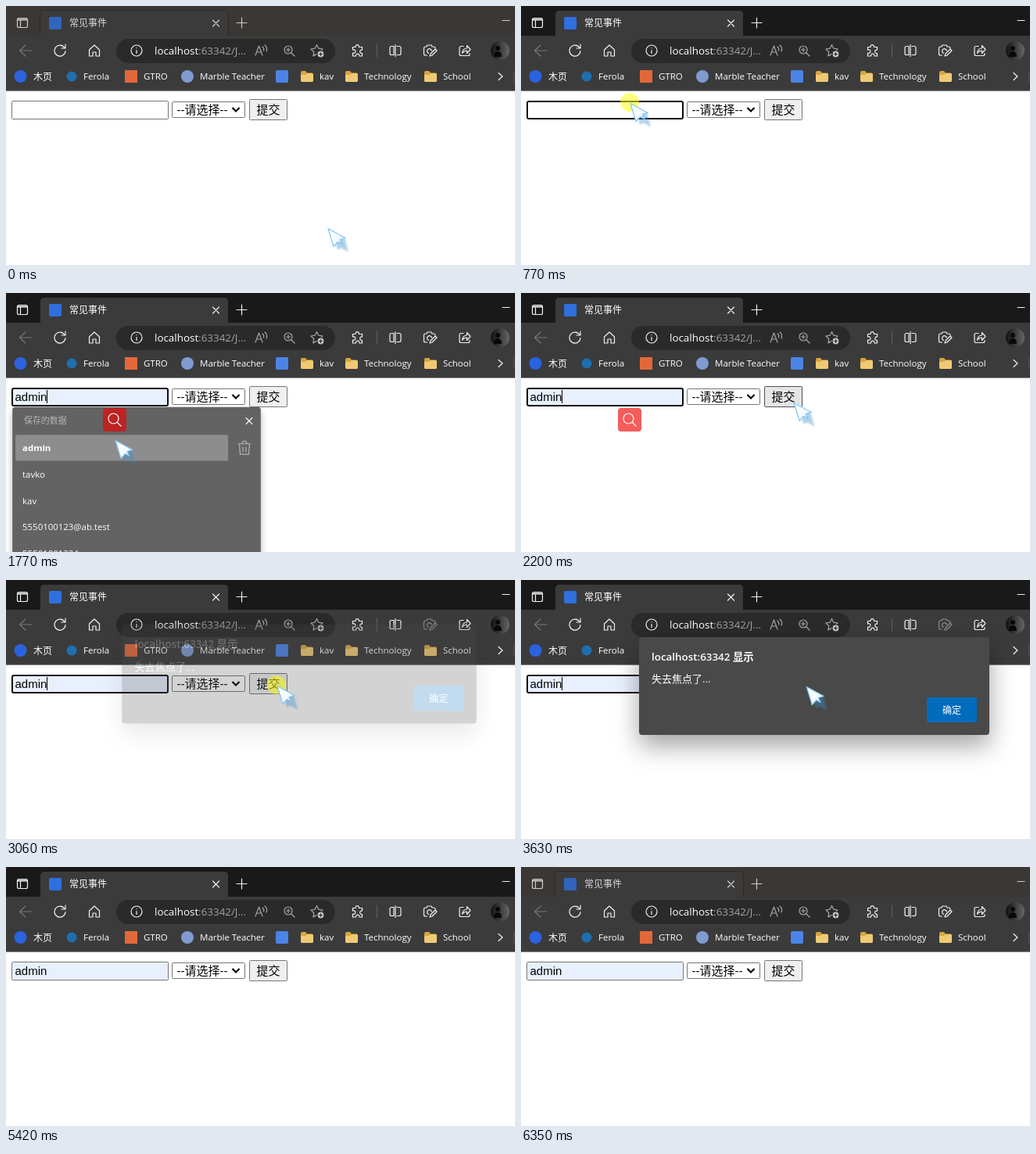
Write an HTML page that moves like this. It is 651x331 px and loops after 6410 ms.

```html
<!DOCTYPE html>
<html lang="zh">
<head>
<meta charset="utf-8">
<style>
html, body { margin: 0; width: 100%; height: 100%; overflow: hidden; background: #fff; }
svg { display: block; width: 651px; height: 331px; }
text { font: 500 11.5px "Open Sans", "Noto Sans CJK SC", "Noto Sans CJK", sans-serif; fill: #fff; white-space: pre; }
.cjk { font-size: 12px; }
.url { font-size: 13.4px; font-weight: 400; }
.form { font: 15px "Liberation Sans", "Noto Sans CJK SC", "Noto Sans CJK", sans-serif; fill: #000; }
.line { fill: none; stroke: #f0f0f0; stroke-width: 1.2; stroke-linecap: round; stroke-linejoin: round; }
.dim { stroke: #a6a6a6; }
</style>
</head>
<body>
<svg viewBox="0 0 651 331">
  <defs>
    <filter id="shade" x="-20%" y="-40%" width="140%" height="200%">
      <feDropShadow dx="0" dy="14" stdDeviation="16" flood-color="#000" flood-opacity=".36"/>
    </filter>
    <filter id="soft" x="-10%" y="-10%" width="120%" height="120%">
      <feDropShadow dx="0" dy="5" stdDeviation="5" flood-color="#000" flood-opacity=".35"/>
    </filter>
    <filter id="blur"><feGaussianBlur stdDeviation="1.3"/></filter>
    <linearGradient id="photo" x2="1"><stop stop-color="#111"/><stop offset="1" stop-color="#666"/></linearGradient>
    <linearGradient id="ice" x2="1" y2="1"><stop stop-color="#fff"/><stop offset=".6" stop-color="#f2faff"/><stop offset="1" stop-color="#a5d8f8"/></linearGradient>
    <g id="folder">
      <path d="M0 2q0-2 2-2h4l2 2.500h6q2 0 2 2v7.500q0 2-2 2H2q-2 0-2-2z" fill="#d9a53f"/>
      <path d="M0 5h6l2-2h6q2 0 2 2v7q0 2-2 2H2q-2 0-2-2z" fill="#efca75"/>
    </g>
  </defs>

  <!-- Title bar -->
  <rect id="titlebar" width="651" height="39"/>
  <path id="tabEdge" d="M43.500 38V11q0-5.500 5-5.500h231q5 0 5 5.500v27" fill="none" stroke="#2c2928"/>
  <path d="M44 38V11q0-5 5-5h230q5 0 5 5v27z" fill="#3b3b3b"/>
  <g id="titleItems">
    <g class="line">
      <rect x="14.500" y="15.500" width="13" height="12" rx="2"/>
      <path stroke-width="2" d="M15 17.500h12"/>
      <path d="M18.500 18.500v9M264.500 18l8 8M272.500 18l-8 8M295 21.500h13M301.500 15v13M635 18.500h9"/>
    </g>
    <rect x="55" y="14" width="16" height="16" rx="2" fill="#2f6fde"/>
    <text class="cjk" x="81" y="26">常见事件</text>
  </g>

  <!-- Toolbar -->
  <rect y="38" width="651" height="71" fill="#3b3b3b"/>
  <rect x="141" y="42" width="280" height="31" rx="15.500" fill="#2a2a2a"/>
  <g class="line">
    <path stroke="#777" d="M33 57H18m7-7l-7.500 7 7.500 7"/>
    <path d="M75 53.500a7 7 0 1 0 1 4M76 49v5h-5"/>
    <path d="M106.500 56l6.500-6 6.500 6v8h-4.500v-5h-4v5h-4.500z"/>
    <circle cx="167" cy="57" r="7"/><path d="M167 56.500v4M167 53.500v.2"/>
    <path class="dim" d="M319 63l4.500-12 4.500 12m-7.500-4h6M328 52q2.500 2 1.500 5M331 50q4 3 2 8"/>
    <g class="dim"><circle cx="361" cy="56" r="5"/><path d="M365 60l4 4M358.500 56h5M361 53.500v5"/></g>
    <path class="dim" d="M397.500 49.500l2.300 4.700 5.200.8-3.800 3.700.9 5.200-4.600-2.500-4.600 2.500.9-5.200-3.800-3.700 5.200-.8z"/>
    <circle cx="402.500" cy="61.500" r="4.500" fill="#c8c8c8" stroke="#2a2a2a"/><path stroke="#2a2a2a" d="M400.500 61.500h4M402.500 59.500v4"/>
    <path d="M443.500 52.500h3.500a2.300 2.300 0 1 1 4.500 0h4v3.500a2.300 2.300 0 1 0 0 4.500v3.500h-3.500a2.300 2.300 0 1 0-4.500 0h-4v-4a2.300 2.300 0 1 0 0-4z"/>
    <path stroke="#5c5c5c" d="M474.500 49v16"/>
    <path d="M496 51.500h-3q-2 0-2 2v7q0 2 2 2h3zM500 51.500h3q2 0 2 2v7q0 2-2 2h-3M498 49.500v15"/>
    <g id="camera"><path d="M549 54q0-2-2-2h-2l-1-2h-5l-1 2h-1.500q-2 0-2 2v7q0 2 2 2h2"/><path d="M544.500 57a3 3 0 1 0-4 3.500M542 64l1-3 6-6 2 2-6 6z"/></g>
    <path d="M585 51.500h-3q-2 0-2 2v8q0 2 2 2h9q2 0 2-2v-1M583.500 60q1-6 6-6v-3.500l4.500 5-4.500 5v-3.500q-3.500 0-6 3z"/>
    <path d="M630 85.500l5 4.500-5 4.500"/><path stroke="#555" d="M649.500 83v14"/>
  </g>
  <circle cx="632" cy="57" r="12" fill="url(#photo)"/>
  <path d="M624 65q0-7 5-7 5 0 5 7zM626 54a3 3 0 1 1 6 0a3 3 0 1 1-6 0" fill="#080808"/>
  <text class="url" x="190" y="62">localhost<tspan fill="#a3a3a3">:63342/J...</tspan></text>

  <!-- Bookmarks -->
  <circle cx="18.500" cy="90" r="8" fill="#2b62df"/>
  <circle cx="84" cy="90" r="6.500" fill="#1d6fb0"/>
  <rect x="152" y="82" width="16" height="16" fill="#e2683a"/>
  <circle cx="232" cy="90" r="8" fill="#7f9bd0"/>
  <rect x="345" y="82" width="16" height="16" rx="2" fill="#4b83e6"/>
  <use href="#folder" x="377" y="83"/><use href="#folder" x="434" y="83"/><use href="#folder" x="535" y="83"/>
  <text class="cjk" x="35" y="94.500">木页</text>
  <text x="99" y="94">Ferola</text>
  <text x="176" y="94">GTRO</text>
  <text x="248" y="94">Marble Teacher</text>
  <text x="401" y="94">kav</text>
  <text x="458" y="94">Technology</text>
  <text x="559" y="94">School</text>

  <!-- Page -->
  <rect y="108" width="651" height="1" fill="#8c8c8c"/>
  <rect y="109" width="651" height="222" fill="#fff"/>
  <rect id="field"/>
  <text id="value" class="form" x="11.500" y="138">admin</text>
  <path id="caret" d="M52.500 124v17" stroke="#000"/>
  <rect x="212.500" y="122.500" width="93" height="20" rx="1" fill="#fff" stroke="#767676"/>
  <text class="form" x="218.500" y="138">--请选择--</text>
  <path d="M289.500 130l4.500 4.500 4.500-4.500" fill="none" stroke="#000" stroke-width="2.200"/>
  <rect id="submit" x="311.500" y="119.500" width="48" height="26" rx="1"/>
  <text class="form" x="320.500" y="138">提交</text>

  <!-- Saved entries -->
  <g id="popup">
    <rect x="7" y="145" width="320" height="211" rx="4" fill="#4a4a4a" filter="url(#soft)"/>
    <text x="22" y="167" style="font-size:11px;fill:#a9a9a9">保存的数据</text>
    <path class="line" d="M308 159l8 8M316 159l-8 8"/>
    <g id="rowHover">
      <rect x="11" y="181" width="274" height="33.500" rx="2" fill="#7a7a7a"/>
      <path class="line dim" d="M298 192.500h16M303 192q0-3 3-3t3 3M299.500 193l1 13h11l1-13M304 196.500v6M308 196.500v6"/>
    </g>
    <text id="firstRow" x="20" y="202">admin</text>
    <text x="20" y="236">tavko</text>
    <text x="20" y="270">kav</text>
    <text x="20" y="304">5550100123@ab.test</text>
    <text x="20" y="338">55501001234</text>
  </g>
  <g id="finder">
    <rect x="124" y="147" width="30" height="30" rx="4" fill="#f00000" opacity=".64"/>
    <g class="line" style="stroke:#fff"><circle cx="137.500" cy="160.500" r="6.500"/><path d="M142.500 165.500l4.500 4.500"/></g>
  </g>

  <!-- Alert -->
  <g id="alert">
    <rect x="151" y="73" width="448" height="125" rx="4" fill="#4a4a4a" filter="url(#shade)"/>
    <text class="url" x="167" y="102.500" style="font-weight:600">localhost:63342 显示</text>
    <text x="167" y="131" style="font-size:13px">失去焦点了...</text>
    <rect x="519" y="150" width="64" height="32" rx="2" fill="#006cbe"/>
    <text class="cjk" x="539" y="170.500">确定</text>
  </g>

  <!-- Pointer -->
  <g id="pointer">
    <circle id="press" cx="-2" cy="-3" r="12" fill="#ff0" opacity=".5"/>
    <g transform="translate(-1 -1.500)">
      <path d="M8 13l13-2 5 19-9-5-5 2z" fill="#3f8fc8" opacity=".4" filter="url(#blur)"/>
      <path d="M0 0L22 12 15 14 18 20 12.500 17 7 23z" fill="url(#ice)" stroke="#83c5f0" stroke-width="1.200" stroke-linejoin="round"/>
    </g>
  </g>
</svg>

<script>
const LOOP = 6410;
const el = Object.fromEntries([...document.querySelectorAll('[id]')].map(node => [node.id, node]));

// Pointer tip: time, x, y
const path = [
  [70, 413, 286], [490, 141, 126], [1320, 141, 126], [1330, 139, 175], [1380, 141, 190],
  [1890, 141, 190], [1950, 146, 156], [2010, 160, 155], [2200, 350, 142], [2260, 360, 140],
  [2410, 348, 137], [3600, 348, 137], [3630, 366, 138], [4260, 541, 167], [5050, 541, 167],
  [5420, 317, 332]
];
const presses = [[710, 1350], [1600, 1710], [3000, 3140], [4600, 4720]];

const within = (t, from, to) => t >= from && t < to;
const progress = (t, from, to) => Math.min(1, Math.max(0, (t - from) / (to - from)));
const show = (node, on) => node.style.display = on ? '' : 'none';
const paint = (node, attrs) => { for (const key in attrs) node.setAttribute(key, attrs[key]); };

function tipAt(t) {
  const next = path.findIndex(point => point[0] > t);
  if (next === 0) return path[0].slice(1);
  if (next < 0) return path.at(-1).slice(1);
  const [a, b] = [path[next - 1], path[next]];
  const p = progress(t, a[0], b[0]);
  return [a[1] + (b[1] - a[1]) * p, a[2] + (b[2] - a[2]) * p];
}

function fade(node, opacity, x, y, scale, lift = 0) {
  show(node, opacity > 0);
  paint(node, { opacity, transform: `translate(${x} ${y + lift}) scale(${scale}) translate(${-x} ${-y})` });
}

function drawField(fill, stroke, weight) {
  paint(el.field, {
    x: 7 + weight / 2, y: 121 + weight / 2, width: 201 - weight, height: 24 - weight,
    rx: weight, fill, stroke, 'stroke-width': weight
  });
}

function draw(t) {
  const active = within(t, 710, 6350);
  const focused = within(t, 710, 4600);
  const filled = t >= 1360;
  const hovered = within(t, 1360, 1950);
  const [x, y] = tipAt(t);

  paint(el.titlebar, { fill: active ? '#191919' : '#3a3735' });
  show(el.tabEdge, !active);
  paint(el.titleItems, { opacity: active ? 1 : .8 });
  paint(el.camera, { opacity: within(t, 3000, 4640) ? .45 : 1 });

  const fieldStroke = focused ? '#101010' : within(t, 450, 710) ? '#4f4f4f' : '#767676';
  drawField(filled ? '#e8f0fe' : '#fff', fieldStroke, focused ? 2 : 1);
  show(el.value, filled);
  show(el.caret, within(t, 1720, 2220) || within(t, 2740, 4600));

  const overSubmit = within(t, 2165, 3000);
  paint(el.submit, { fill: overSubmit ? '#e5e5e5' : '#efefef', stroke: overSubmit ? '#4f4f4f' : '#767676' });

  const popupGone = t < 1400 ? 1 - progress(t, 780, 1050) : progress(t, 1746, 1916);
  fade(el.popup, 1 - popupGone, 167, 230, 1 - .05 * popupGone);
  show(el.rowHover, hovered);
  el.firstRow.style.fontWeight = hovered ? 700 : 500;
  show(el.finder, within(t, 1730, 2400));

  const alertGone = t < 4000 ? 1 - progress(t, 3000, 3260) : progress(t, 4640, 4820);
  fade(el.alert, 1 - alertGone, 375, 135.5, 1 + .016 * alertGone, -20 * alertGone);

  show(el.pointer, t < 5420);
  paint(el.pointer, { transform: `translate(${x} ${y})` });
  show(el.press, presses.some(([from, to]) => within(t, from, to)));
}

const start = performance.now();
function tick() {
  draw((performance.now() - start) % LOOP);
  requestAnimationFrame(tick);
}
draw(0);
tick();
</script>
</body>
</html>
```
